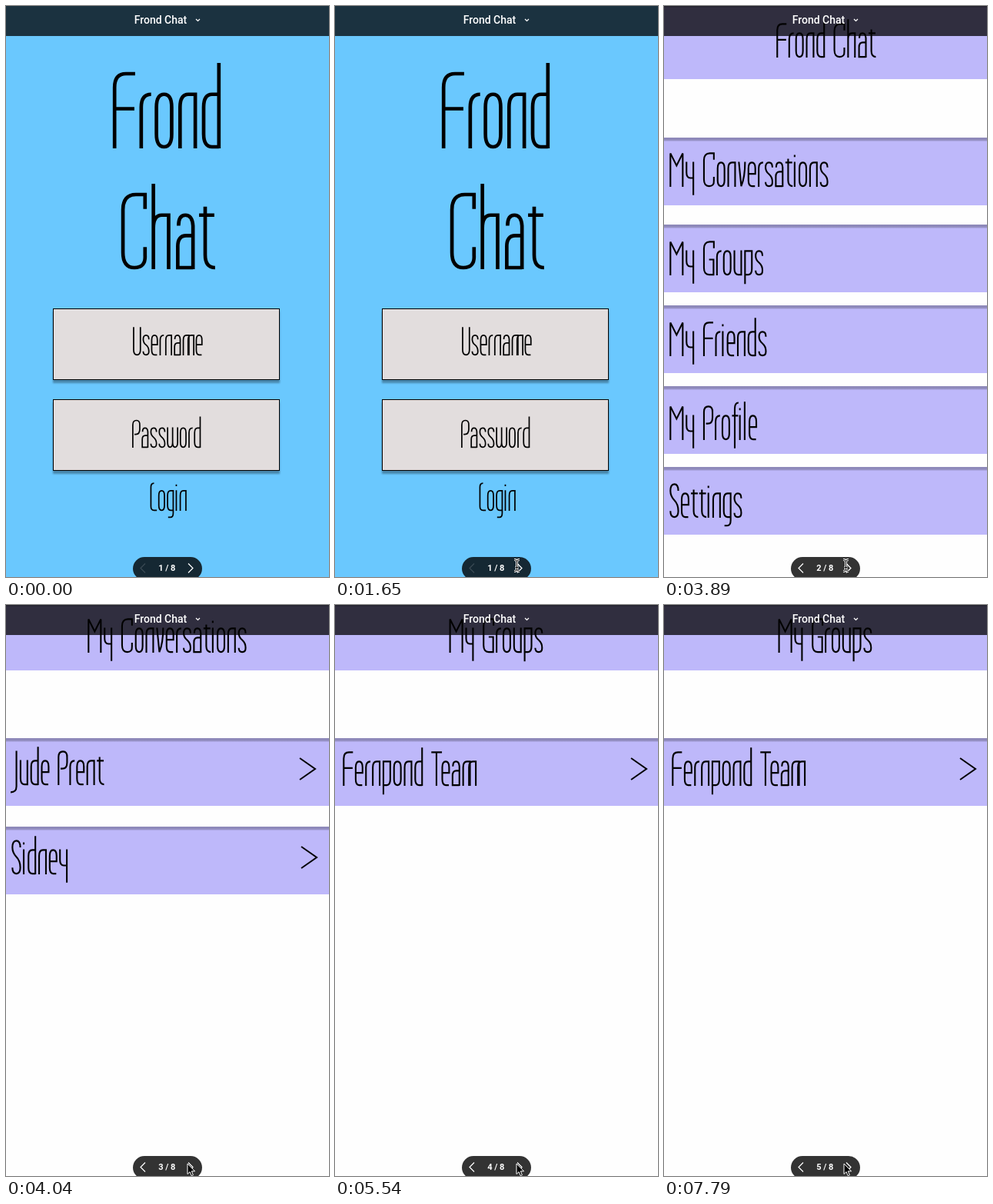
These frames come from a looping animation (420x742 px, 8000 ms). An HTML page:

```html
<!DOCTYPE html>
<html lang="en">
<head>
<meta charset="utf-8">
<title>Chat prototype</title>
<style>
  html, body { margin: 0; width: 100%; height: 100%; overflow: hidden; background: #fefefe; }
  svg { display: block; width: 100%; height: 100%; }
  .line { fill: none; stroke: #000; }
  .ui { font-family: Roboto, Inter, sans-serif; font-weight: 500; fill: #fff; text-anchor: middle; }
  .field { fill: #e2dddd; stroke: #000; filter: drop-shadow(0 4px 1.2px rgba(0, 0, 0, .32)); }
</style>
</head>
<body>
<svg id="stage" viewBox="0 0 420 742">
  <defs>
    <linearGradient id="band" x2="0" y2="1">
      <stop offset="0" stop-color="#8d88b8"/>
      <stop offset=".035" stop-color="#8f8abc"/>
      <stop offset=".06" stop-color="#beb8fa"/>
    </linearGradient>
  </defs>
</svg>
<script>
const LOOP = 8000;
const stage = document.getElementById('stage');

function add(parent, tag, attrs, text) {
  const el = document.createElementNS('http://www.w3.org/2000/svg', tag);
  for (const key in attrs) el.setAttribute(key, attrs[key]);
  if (text) el.textContent = text;
  parent.append(el);
  return el;
}

// Condensed monoline lettering: baseline 0, capitals 100 units high.
const stem = (x, top, bottom = 0) => `M${x} ${top}V${bottom}`;
const arch = x => `M${x} 0V-54Q${x} -71 ${x + 11} -71H${x + 20}V0`;
const cup = (x, top, w) => `M${x} ${top}V-19Q${x} -2 ${x + w / 2} -2T${x + w} -19V${top}`;
const ring = 'M3 -54Q3 -71 13 -71T23 -54V-19Q23 -2 13 -2T3 -19Z';
const bowl = 'M23 -2H14Q3 -2 3 -19V-54Q3 -71 14 -71H23';
const back = 'M32 -79V-98H20Q3 -98 3 -78V-22Q3 -2 18 -2';
const snake = (w, h) => {
  const l = 3, r = l + w, m = l + w / 2, q = h / 5;
  return `M${r} ${-h + q}Q${r} ${-h} ${m} ${-h}T${l} ${-h + q}Q${l} ${-3.2 * q} ${m} ${-2.6 * q}` +
    `T${r} ${-q}Q${r} -2 ${m} -2T${l} ${-q}`;
};

// letter: [advance, path]
const glyphs = {
  ' ': [19, ''],
  a: [31, 'M4 -57Q4 -71 13 -71T23 -57V0M23 -44H14Q3 -44 3 -30V-2H23'],
  d: [31, bowl + stem(23, -112)],
  e: [30, 'M3 -38H23V-54Q23 -71 13 -71T3 -54V-19Q3 -2 13 -2H22'],
  f: [20, stem(8, -92, 24) + 'M8 -92Q8 -109 19 -109M0 -71H18'],
  g: [31, bowl + 'V8Q23 23 13 23H5'],
  h: [32, stem(3, -112) + arch(3)],
  i: [14, stem(3, -73) + stem(3, -93, -87)],
  l: [14, stem(3, -112)],
  m: [46, arch(3) + arch(20)],
  n: [31, arch(3)],
  o: [31, ring],
  p: [31, 'M3 25V-71H23V-19Q23 -2 13 -2H3'],
  r: [20, 'M3 0V-54Q3 -71 16 -71'],
  s: [30, snake(20, 71)],
  t: [24, 'M8 -82V-19Q8 -2 21 -2M0 -71H20'],
  u: [31, 'M3 -73V-19Q3 -2 14 -2H23V-73'],
  v: [28, 'M3 -73L10 -2Q21 -28 21 -73'],
  w: [46, cup(3, -73, 18) + cup(21, -73, 18)],
  y: [32, 'M3 -73V-42Q3 -26 14 -26H23' + stem(23, -73, 24)],
  C: [40, back + 'T32 -18V-29'],
  F: [35, 'M3 0V-80Q3 -98 18 -98H30M3 -52H29'],
  G: [38, back + 'H31V-46H18'],
  J: [26, 'M17 -100V4Q17 21 0 21'],
  L: [28, 'M14 -98Q3 -98 3 -84V-16Q3 -2 14 -2H24'],
  M: [47, 'M3 0V-98L21 -62L39 -98V0'],
  P: [34, 'M3 0V-82Q3 -98 16 -98T28 -80V-66Q28 -48 14 -48H9'],
  S: [33, snake(23, 98)],
  T: [29, 'M0 -98H31' + stem(15, -98)],
  U: [34, cup(3, -100, 24)],
};

function letter(parent, text, x, y, size = .445, centred = false) {
  const width = [...text].reduce((sum, c) => sum + glyphs[c][0], -6);
  const left = centred ? x - width * size / 2 : x;
  const g = add(parent, 'g', {
    class: 'line', role: 'img', 'aria-label': text, 'stroke-width': 4.7,
    transform: `translate(${left} ${y}) scale(${size})`,
  });
  let pen = 0;
  for (const c of text) {
    add(g, 'path', { d: glyphs[c][1], transform: `translate(${pen})` });
    pen += glyphs[c][0];
  }
}

const rect = (parent, x, y, width, height, attrs) =>
  add(parent, 'rect', { x, y, width, height, ...attrs });

function page(fill) {
  const g = add(stage, 'g', { visibility: 'hidden' });
  rect(g, 0, 0, 420, 742, { fill });
  return g;
}

function header(g, text, x, y, height) {
  rect(g, 0, 0, 420, height, { fill: '#beb8fa' });
  rect(g, 0, 0, 420, 1.5, { fill: '#8f8abc' });
  letter(g, text, x, y, .445, true);
}

function row(g, text, top, x, y, arrowX) {
  rect(g, 0, top, 420, 88, { fill: 'url(#band)' });
  letter(g, text, x, y);
  if (arrowX) {
    add(g, 'path', {
      class: 'line', 'stroke-width': 2, d: `M${arrowX} ${top + 26}l20 14l-20 14`,
    });
  }
}

const login = page('#6ac8fe');
letter(login, 'Frond', 208.5, 185, .99, true);
letter(login, 'Chat', 209, 342, .99, true);
for (const y of [393.5, 511.5]) rect(login, 61.5, y, 294, 92, { class: 'field' });
letter(login, 'Username', 210, 454, .367, true);
letter(login, 'Password', 208.5, 574, .362, true);
letter(login, 'Login', 211, 656, .367, true);

const menu = page('#fefefe');
header(menu, 'Frond Chat', 210, 67, 95);
row(menu, 'My Conversations', 171, 7, 235);
row(menu, 'My Groups', 284, 7, 350);
row(menu, 'My Friends', 389, 7, 455);
row(menu, 'My Profile', 494, 7, 564);
row(menu, 'Settings', 599, 7, 665);

const talks = page('#fefefe');
header(talks, 'My Conversations', 209, 62, 85);
row(talks, 'Jude Prent', 173, 6, 234, 382);
row(talks, 'Sidney', 288, 7, 350, 384);

const groups = page('#fefefe');
header(groups, 'My Groups', 209, 62, 85);
row(groups, 'Fernpond Team', 173, 10, 235, 385);

// Viewer chrome
rect(stage, 0, 0, 420, 39, { fill: 'rgba(0,0,0,.75)' });
add(stage, 'text', { class: 'ui', x: 201, y: 23, 'font-size': 14 }, 'Frond Chat');
const chevron = (d, width) =>
  add(stage, 'path', { d, fill: 'none', stroke: '#fff', 'stroke-width': width });
chevron('M247 17l2.5 2.5l2.5 -2.5', 1.2);
rect(stage, 165, 716, 90, 30, { rx: 15, fill: 'rgba(0,0,0,.8)' });
const prev = chevron('M181 724.5l-6 6l6 6', 1.2);
chevron('M237 724.5l6 6l-6 6', 1.2);
const counter = add(stage, 'text', { class: 'ui', x: 209.3, y: 734, 'font-size': 11 }, '1 / 8');
counter.style.fontWeight = 700;

// Pointers, origin at the arrow tip or the centre of the beam
const arrow = add(stage, 'path', {
  d: 'M0 0V13.5L3.1 10.6L5.2 15.6L7.4 14.7L5.3 9.8H9.6Z',
  fill: '#000', stroke: '#fff', 'stroke-width': 1,
});
const beam = add(stage, 'g', { fill: 'none' });
for (const [stroke, width] of [['#fff', 3], ['#000', 1]]) {
  add(beam, 'path', {
    d: 'M-3.5 -7.5Q0 -7.5 0 -5Q0 -7.5 3.5 -7.5M0 -5V5M-3.5 7.5Q0 7.5 0 5Q0 7.5 3.5 7.5M-2 2.5H2',
    stroke, 'stroke-width': width,
  });
}

// [start, page, number]
const views = [
  [0, login, 1], [1800, menu, 2], [4040, talks, 3], [5540, groups, 4], [6890, groups, 5],
];
// [start, pointer, x, y]
const moves = [
  [0, null, 0, 0],
  [300, arrow, 219, 733], [600, arrow, 219, 729], [750, arrow, 232, 724],
  [900, arrow, 232, 725], [1050, arrow, 232, 726], [1200, arrow, 232, 727],
  [1350, arrow, 232, 729], [1500, arrow, 232, 728], [1650, beam, 236.5, 727],
  [1800, arrow, 236, 726], [3890, beam, 236.5, 727],
  [4040, arrow, 236, 726], [5390, beam, 236.5, 727],
  [5540, arrow, 236, 726], [5690, arrow, 235, 726],
  [6740, beam, 235.5, 726], [6890, arrow, 234, 725], [7790, arrow, 234, 726],
];

const at = (steps, t) => steps.findLast(step => step[0] <= t);
const show = (el, on) => el.setAttribute('visibility', on ? 'visible' : 'hidden');

function draw(t) {
  const [, view, number] = at(views, t);
  for (const g of [login, menu, talks, groups]) show(g, g === view);
  counter.textContent = `${number} / 8`;
  prev.setAttribute('stroke-opacity', number === 1 ? .16 : 1);

  const [, pointer, x, y] = at(moves, t);
  for (const el of [arrow, beam]) show(el, el === pointer);
  if (pointer) pointer.setAttribute('transform', `translate(${x} ${y})`);
}

const start = performance.now();
function tick() {
  draw((performance.now() - start) % LOOP);
  requestAnimationFrame(tick);
}
tick();
</script>
</body>
</html>
```
